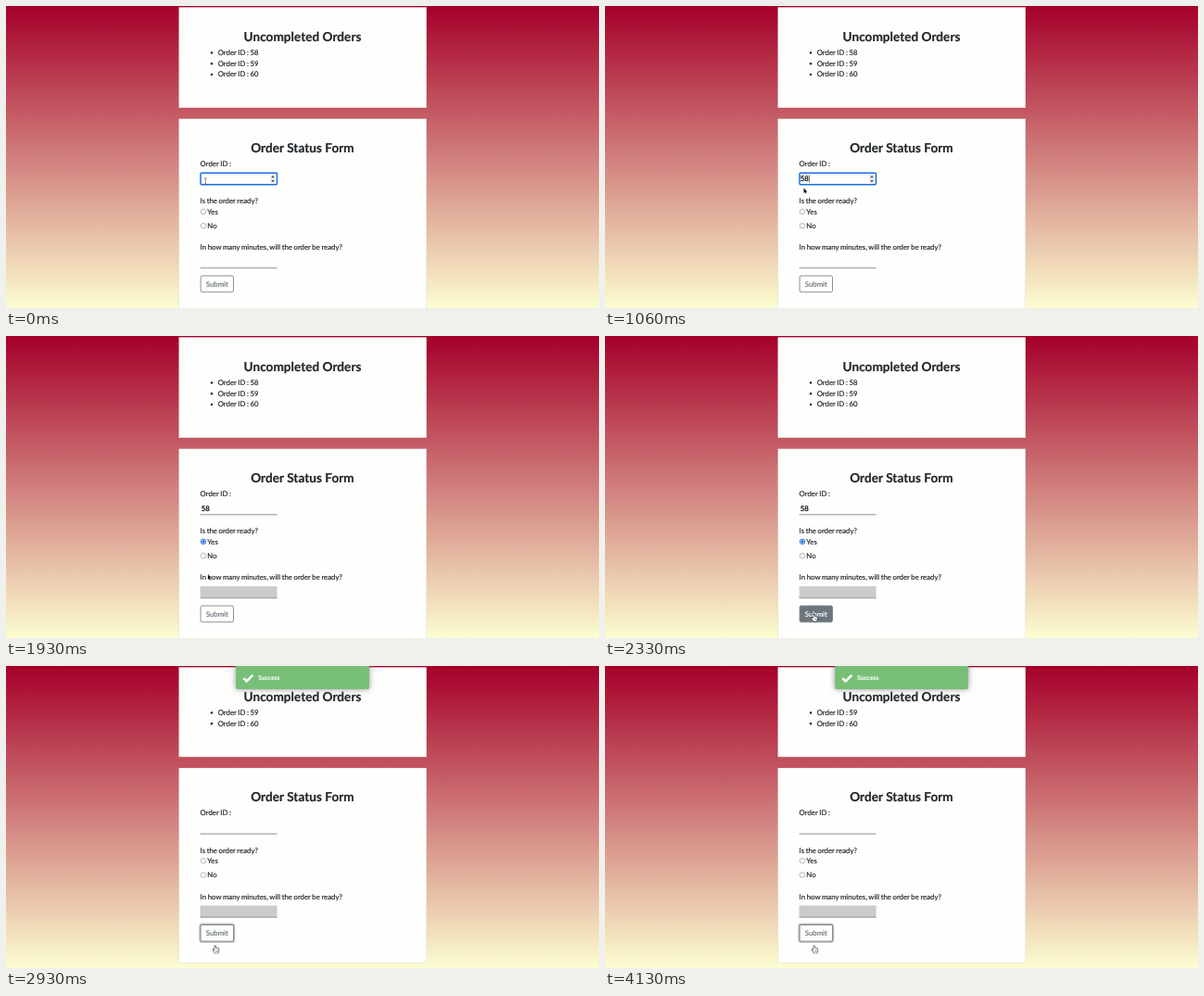
Write an HTML page with a canvas that moves like this. It is 640 px wide and 326 px high and loops after 4.2 s.

```html
<!DOCTYPE html>
<html lang="en">
<head>
<meta charset="utf-8">
<title>Order status</title>
<style>
  html, body { margin: 0; width: 100%; height: 100%; overflow: hidden; background: #a50029; }
  canvas { display: block; width: 640px; height: 326px; }
</style>
</head>
<body>
<canvas id="stage"></canvas>
<script>
const W = 640, H = 326, LOOP = 4200;
const INK = '#212529', GREY = '#6c757d', BLUE = '#1a6fe0';
const BODY = '7.8px Lato, sans-serif';
const LINE = 11.7;

// Moments of the story, in ms
const T = {
  five: 400, eight: 470, leave: 930, press: 1400, check: 1530,
  go: 1660, arrive: 2200, submit: 2400, reset: 2480
};

const canvas = document.getElementById('stage');
const ctx = canvas.getContext('2d');
const ratio = window.devicePixelRatio || 1;
canvas.width = W * ratio;
canvas.height = H * ratio;

const clamp = v => Math.max(0, Math.min(1, v));
const progress = (t, from, to) => clamp((t - from) / (to - from));
const ease = p => p * p * (3 - 2 * p);
const mix = (a, b, p) => a + (b - a) * p;

// A hairline stroke gives the slightly heavy look of smoothed screen type
function text(str, x, y, font = BODY, color = INK, align = 'left') {
  ctx.font = font;
  ctx.wordSpacing = font === BODY ? '-0.4px' : '0px';
  ctx.fillStyle = ctx.strokeStyle = color;
  ctx.lineWidth = 0.18;
  ctx.textAlign = align;
  ctx.fillText(str, x, y);
  ctx.strokeText(str, x, y);
}

function rect(x, y, w, h, color) {
  ctx.fillStyle = color;
  ctx.fillRect(x, y, w, h);
}

function polygon(points, fill, stroke, width = 0.8) {
  ctx.beginPath();
  points.forEach(([x, y]) => ctx.lineTo(x, y));
  ctx.closePath();
  if (stroke) {
    ctx.strokeStyle = stroke;
    ctx.lineWidth = width;
    ctx.stroke();
  }
  ctx.fillStyle = fill;
  ctx.fill();
}

function circle(x, y, r, fill, stroke, width = 0.7) {
  ctx.beginPath();
  ctx.arc(x, y, r, 0, Math.PI * 2);
  if (fill) { ctx.fillStyle = fill; ctx.fill(); }
  if (stroke) { ctx.strokeStyle = stroke; ctx.lineWidth = width; ctx.stroke(); }
}

function roundRect(x, y, w, h, r) {
  ctx.beginPath();
  ctx.roundRect(x, y, w, h, r);
}

function background() {
  const g = ctx.createLinearGradient(0, 0, 0, H);
  g.addColorStop(0, '#a50029');
  g.addColorStop(1, '#fcfdd0');
  rect(0, 0, W, H, g);
}

function card(y, h) {
  rect(186.5, y, 267.4, h, '#fefefd');
  ctx.strokeStyle = 'rgba(0,0,0,.125)';
  ctx.lineWidth = 0.5;
  ctx.strokeRect(186.75, y + 0.25, 266.9, h - 0.5);
}

function title(str, y) {
  text(str, 320, y, 'bold 13.65px Lato, sans-serif', INK, 'center');
}

function orders(ids) {
  card(1.3, 73.5 + ids.length * LINE);
  title('Uncompleted Orders', 37.7);
  ids.forEach((id, i) => {
    const y = 52.9 + i * LINE;
    circle(222, y - 2.3, 1.25, INK);
    text('Order ID : ' + id, 228.7, y);
  });
}

function radio(y, checked) {
  circle(213, y, 2.8, '#fff', checked ? BLUE : '#858585', checked ? 0.9 : 0.6);
  if (checked) circle(213, y, 1.7, BLUE);
}

function underline(y) {
  rect(209.6, y, 83, 0.9, '#858585');
}

function spinner() {
  roundRect(285.2, 181.6, 5.6, 10, 1.5);
  ctx.fillStyle = '#ececec';
  ctx.fill();
  polygon([[286.3, 185.3], [288, 183.1], [289.7, 185.3]], '#444');
  polygon([[286.3, 188], [288, 190.2], [289.7, 188]], '#444');
}

function orderInput(value, focused) {
  if (focused) {
    roundRect(210, 180.3, 82.5, 12.4, 1);
    ctx.strokeStyle = BLUE;
    ctx.lineWidth = 1.5;
    ctx.stroke();
    spinner();
  } else {
    underline(192.4);
  }
  text(value, 210.7, 189, '500 7.8px Lato, sans-serif', '#000');
  if (focused && value) {
    rect(211.1 + ctx.measureText(value).width, 182.3, 0.6, 8.3, '#222');
  }
}

function submitButton(fill, ring) {
  if (ring) {
    roundRect(209.2, 290.3, 37.2, 19.4, 2.6);
    ctx.strokeStyle = 'rgba(108,117,125,.5)';
    ctx.lineWidth = 1.6;
    ctx.stroke();
  }
  roundRect(210.1, 291.2, 35.4, 17.6, 1.8);
  ctx.fillStyle = `rgba(108,117,125,${fill})`;
  ctx.fill();
  ctx.strokeStyle = GREY;
  ctx.lineWidth = 0.8;
  ctx.stroke();
  const tone = [108, 117, 125].map(c => Math.round(mix(c, 255, fill)));
  text('Submit', 227.8, 302.8, BODY, `rgb(${tone})`, 'center');
}

function form(t, done) {
  const checked = t >= T.check && !done;
  const value = done || t < T.five ? '' : t < T.eight ? '5' : '58';
  ctx.save();
  if (done) ctx.translate(0, -LINE);
  card(121.7, 211);
  title('Order Status Form', 157.7);
  text('Order ID :', 209.6, 173.1);
  orderInput(value, t < T.press);
  text('Is the order ready?', 209.6, 213.2);
  radio(222, checked);
  text('Yes', 217.3, 224.8);
  radio(237.3, false);
  text('No', 217.3, 240.1);
  text('In how many minutes, will the order be ready?', 209.6, 263.3);
  if (t >= T.check) rect(209.6, 270.2, 83, 12.5, '#cbcbcb');
  underline(282.4);
  const hover = progress(t, T.arrive - 60, T.arrive + 80) * (1 - progress(t, 2560, 2700));
  submitButton(hover, t >= T.submit);
  ctx.restore();
}

function toast(opacity) {
  if (!opacity) return;
  ctx.save();
  ctx.globalAlpha = opacity;
  ctx.shadowColor = 'rgba(120,120,120,.8)';
  ctx.shadowBlur = 6 * ratio;
  roundRect(248.2, -4, 143.8, 29, 1.5);
  ctx.fillStyle = '#77bf77';
  ctx.fill();
  ctx.shadowColor = 'transparent';
  ctx.beginPath();
  ctx.moveTo(256.3, 13.2);
  ctx.lineTo(259.7, 16.4);
  ctx.lineTo(266.3, 9.8);
  ctx.strokeStyle = '#fff';
  ctx.lineWidth = 2.5;
  ctx.stroke();
  text('Success', 272.3, 15.4, 'bold 6.7px Lato, sans-serif', '#f4fbf4');
  ctx.restore();
}

function clickRing(x, y, p) {
  if (p <= 0 || p >= 1) return;
  const size = Math.min(1, (1 - p) * 1.5);
  const alpha = 0.3 + 0.45 * size;
  circle(x, y, 15.6 * size, 'rgba(255,255,255,.35)', `rgba(218,105,122,${alpha})`, 0.4 + 1.7 * size);
}

function beam(x, y) {
  ctx.beginPath();
  ctx.moveTo(x - 1.4, y - 3.4);
  ctx.lineTo(x, y - 2.9);
  ctx.lineTo(x + 1.4, y - 3.4);
  ctx.moveTo(x, y - 2.9);
  ctx.lineTo(x, y + 2.9);
  ctx.moveTo(x - 1.4, y + 3.4);
  ctx.lineTo(x, y + 2.9);
  ctx.lineTo(x + 1.4, y + 3.4);
  ctx.strokeStyle = '#555';
  ctx.lineWidth = 0.7;
  ctx.stroke();
}

function arrow(x, y) {
  const shape = [[0, 0], [0, 5.6], [1.3, 4.4], [2.1, 6.3], [3, 5.9], [2.2, 4.1], [3.9, 4]];
  polygon(shape.map(([a, b]) => [x + a, y + b]), '#111', '#fff', 1);
}

function hand(x, y) {
  const shape = [[-1.3, -3.6], [-0.3, -3.6], [0, -1.2], [3, -0.6], [3.2, 1.5], [2.3, 3.9],
    [-1, 3.9], [-3, 1], [-2.6, 0], [-1.2, 0.9]];
  polygon(shape.map(([a, b]) => [x + a, y + b]), '#fff', '#222', 1.1);
  for (const dx of [0, 1, 2]) rect(x + dx, y + 1, 0.4, 1.9, '#555');
}

function pointer(t) {
  const toRadio = ease(progress(t, T.leave, T.press - 40));
  const toButton = ease(progress(t, T.go, T.arrive + 60));
  const late = progress(t, 2340, 2460);
  const x = mix(mix(215.3, 211.8, toRadio), 226, toButton) + 0.5 * late;
  const y = mix(mix(189, 222.6, toRadio), 304, toButton) + 1.8 * late;
  if (t >= T.go && y > 291) hand(x, y);
  else if (y < 194) beam(x, y);
  else arrow(x, y);
}

function draw(t) {
  const done = t >= T.reset;
  ctx.setTransform(ratio, 0, 0, ratio, 0, 0);
  ctx.textRendering = 'geometricPrecision';
  ctx.lineJoin = 'miter';
  background();
  orders(done ? [59, 60] : [58, 59, 60]);
  form(t, done);
  toast(ease(progress(t, 2485, 2860)));
  clickRing(212.5, 224.3, progress(t, T.press - 10, 1680));
  clickRing(226.3, 302.5, progress(t, T.submit - 30, 2570));
  pointer(t);
}

function tick() {
  draw(performance.now() % LOOP);
  requestAnimationFrame(tick);
}
tick();
</script>
</body>
</html>
```
